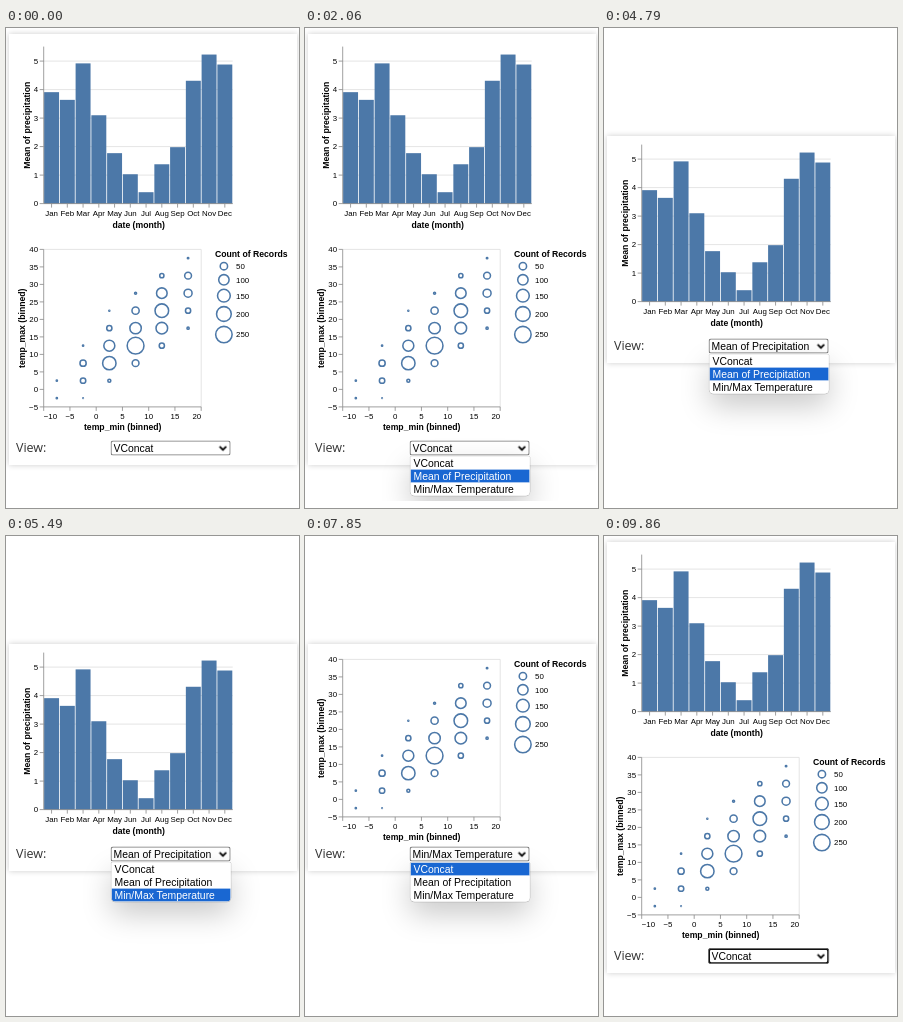
An HTML page that plays this animation: 293x480 px, repeating every 9990 ms.

```html
<!DOCTYPE html>
<html lang="en">
<head>
<meta charset="utf-8">
<title>Chart view switcher</title>
<style>
  html, body { margin: 0; width: 100%; height: 100%; overflow: hidden; background: #fff; }
  .stage { position: relative; width: 293px; height: 473px; overflow: hidden; }
  .card, .controls, svg, .controls > *, .value { position: absolute; box-sizing: border-box; }
  .step, .row { animation: 9990ms step-end infinite; }

  .card { left: 3px; width: 287.5px; background: #fff; box-shadow: 0 0 6px rgba(0,0,0,.2); animation-name: card; }
  svg { left: 0; top: 0; font-family: "Liberation Sans", Arial, sans-serif; font-size: 7.88px; }
  .title { font-size: 8.66px; font-weight: bold; }
  .axis { stroke: #888; stroke-width: .8; fill: none; }
  .grid { stroke: #ddd; stroke-width: .8; fill: none; }
  .bar { fill: #4c78a8; }
  .dot { fill: none; stroke: #4c78a8; stroke-width: 1.55; }
  #bars { animation-name: bars; }
  #scatter { animation-name: scatter; }

  .controls { left: 0; top: 0; width: 293px; height: 480px; animation-name: controls;
    font: 10.4px/13px "Liberation Sans", Arial, sans-serif; color: #000; white-space: nowrap; }
  .label { left: 10.4px; top: 410px; font: 12.5px/19px "Open Sans", sans-serif; color: #333; }
  .select { left: 105px; top: 413px; width: 120px; height: 15px; border-radius: 2.5px; background: #fff;
    box-shadow: inset 0 0 0 1px #767676; animation-name: focus; }
  .value { left: 3px; top: 1px; }
  .v0 { animation-name: value0; }
  .v1 { animation-name: value1; }
  .v2 { animation-name: value2; }
  .popup { left: 0; top: 0; animation-name: popup; }
  .popup > * { position: absolute; left: 106px; top: 428.5px; width: 118.5px; height: 39px;
    border-radius: 1px 1px 4px 4px; }
  .list { overflow: hidden; background: #fff; }
  .shade { box-shadow: 0 0 0 .7px rgba(0,0,0,.25), 0 12px 30px rgba(0,0,0,.22); }
  .row { height: 13px; padding-left: 3px; }
  .r0 { animation-name: row0; }
  .r1 { animation-name: row1; }
  .r2 { animation-name: row2; }

  @keyframes card {
    0%, 83.08% { top: 5.5px; height: 431px; }
    35.03% { top: 108px; height: 226.5px; }
  }
  @keyframes bars {
    0%, 83.08% { transform: none; opacity: 1; }
    35.03% { transform: translateY(98px); opacity: 1; }
    58.95% { transform: none; opacity: 0; }
  }
  @keyframes scatter {
    0%, 83.08% { transform: none; opacity: 1; }
    35.03% { transform: none; opacity: 0; }
    58.95% { transform: translateY(-98px); opacity: 1; }
  }
  @keyframes controls {
    0%, 83.08% { transform: translate(-.4px, -.4px); }
    35.03% { transform: translate(-.4px, -102.4px); }
  }
  @keyframes popup {
    0%, 35.03%, 58.95%, 83.08% { opacity: 0; }
    13.01%, 47.34%, 73.57% { opacity: 1; }
  }
  @keyframes focus {
    0%, 47.34%, 73.57% { box-shadow: inset 0 0 0 1px #767676; }
    35.03%, 58.95%, 83.08%, 100% { box-shadow: inset 0 0 0 1.4px #101010, 0 0 0 .5px #101010; }
  }
  @keyframes value0 { 0%, 83.08% { opacity: 1; } 35.03% { opacity: 0; } }
  @keyframes value1 { 0%, 58.95% { opacity: 0; } 35.03% { opacity: 1; } }
  @keyframes value2 { 0%, 83.08% { opacity: 0; } 58.95% { opacity: 1; } }
  @keyframes row0 {
    0%, 50.55%, 77.37% { background: #1967d2; color: #fff; }
    19.41%, 52.05% { background: #fff; color: #000; }
  }
  @keyframes row1 {
    0%, 50.55%, 53.75% { background: #fff; color: #000; }
    19.41%, 52.05% { background: #1967d2; color: #fff; }
  }
  @keyframes row2 {
    0%, 77.37% { background: #fff; color: #000; }
    53.75% { background: #1967d2; color: #fff; }
  }
</style>
</head>
<body>
<div class="stage">
  <div class="card step"></div>
  <svg width="293" height="480" viewBox="0 0 293 480">
    <g id="bars" class="step"></g>
    <g id="scatter" class="step"></g>
  </svg>
  <div class="controls step">
    <span class="label">View:</span>
    <div class="select step">
      <span class="value v0 step">VConcat</span>
      <span class="value v1 step">Mean of Precipitation</span>
      <span class="value v2 step">Min/Max Temperature</span>
      <svg width="120" height="15"><path d="M109 5.8l3.3 3.4 3.3-3.4" fill="none" stroke="#000" stroke-width="1.7"/></svg>
    </div>
    <div class="popup step">
      <div class="shade"></div>
      <div class="list">
        <div class="row r0">VConcat</div>
        <div class="row r1">Mean of Precipitation</div>
        <div class="row r2">Min/Max Temperature</div>
      </div>
    </div>
  </div>
</div>
<script>
  const LEFT = 37.7;

  function add(parent, tag, attrs, text) {
    const el = document.createElementNS("http://www.w3.org/2000/svg", tag);
    for (const key in attrs) el.setAttribute(key, attrs[key]);
    if (text !== undefined) el.textContent = text;
    parent.append(el);
  }
  const path = (g, cls, d) => add(g, "path", { class: cls, d });
  const label = (g, x, y, text, anchor = "middle") =>
    add(g, "text", { x, y: y + 2.8, "text-anchor": anchor }, text);
  const title = (g, x, y, text, turn = 0, anchor = "middle") =>
    add(g, "text", { class: "title", y: 3, "text-anchor": anchor,
      transform: `translate(${x} ${y}) rotate(${turn})` }, text);
  const signed = n => String(n).replace("-", "\u2212");

  function drawBars(g) {
    const base = 175.6, unit = 28.5, band = 15.75, right = LEFT + 12 * band;
    const months = "Jan Feb Mar Apr May Jun Jul Aug Sep Oct Nov Dec".split(" ");
    const rain = [3.91, 3.64, 4.92, 3.1, 1.77, 1.03, .4, 1.38, 1.98, 4.31, 5.23, 4.88];
    for (let n = 0; n <= 5; n++) {
      const y = base - n * unit;
      path(g, "grid", `M${LEFT} ${y}H${right}`);
      path(g, "axis", `M${LEFT - 4} ${y}h4`);
      label(g, LEFT - 5.6, y, n, "end");
    }
    months.forEach((month, i) => {
      const x = LEFT + i * band, height = rain[i] * unit;
      add(g, "rect", { class: "bar", x: x + .4, y: base - height, width: band - .8, height });
      path(g, "axis", `M${x + band / 2} ${base}v4`);
      label(g, x + band / 2, base + 9.7, month);
    });
    path(g, "axis", `M${LEFT} 18.6V${base}H${right}`);
    title(g, 132.6, 196.7, "date (month)");
    title(g, 20.5, 97.2, "Mean of precipitation", -90);
  }

  function drawScatter(g) {
    const size = 157.5, top = 221.4, base = top + size;
    const px = t => LEFT + (t + 10) * size / 30;
    const py = t => base - (t + 5) * size / 45;
    path(g, "grid", `M${LEFT} ${top}h${size}V${base}`);
    path(g, "axis", `M${LEFT} ${top}V${base}h${size}`);
    for (let t = -5; t <= 40; t += 5) {
      path(g, "axis", `M${LEFT - 4} ${py(t)}h4`);
      label(g, LEFT - 5.6, py(t), signed(t), "end");
    }
    for (let t = -10; t <= 20; t += 5) {
      const anchor = t === -10 ? "start" : t === 20 ? "end" : "middle";
      path(g, "axis", `M${px(t)} ${base}v4`);
      label(g, px(t), base + 9, signed(t), anchor);
    }
    // One column per temp_min bin: lowest temp_max bin, then radii upwards.
    const columns = [
      [-2.5, .6, .6],
      [-2.5, .3, 2.7, 3.1, .6],
      [2.5, 1.5, 6.7, 5.5, 2.6, .5],
      [7.5, 3.4, 8.4, 5.7, 3.6, 1],
      [12.5, 2.6, 5.8, 6.8, 5.3, 2.1],
      [17.5, 1.1, 2.6, 4, 3.4, .7]
    ];
    columns.forEach(([low, ...radii], i) => radii.forEach((r, k) =>
      add(g, "circle", { class: "dot", cx: px(i * 5 - 7.5), cy: py(low + k * 5), r })));
    title(g, 116.7, 399.2, "temp_min (binned)");
    title(g, 16, 300.2, "temp_max (binned)", -90);

    title(g, 209, 225.8, "Count of Records", 0, "start");
    [238.2, 251.8, 267.7, 286, 306.6].forEach((y, i) => {
      const count = 50 * (i + 1);
      add(g, "circle", { class: "dot", cx: 217.9, cy: y, r: .52 * Math.sqrt(count) });
      label(g, 230, y, count, "start");
    });
  }

  drawBars(document.getElementById("bars"));
  drawScatter(document.getElementById("scatter"));
</script>
</body>
</html>
```
